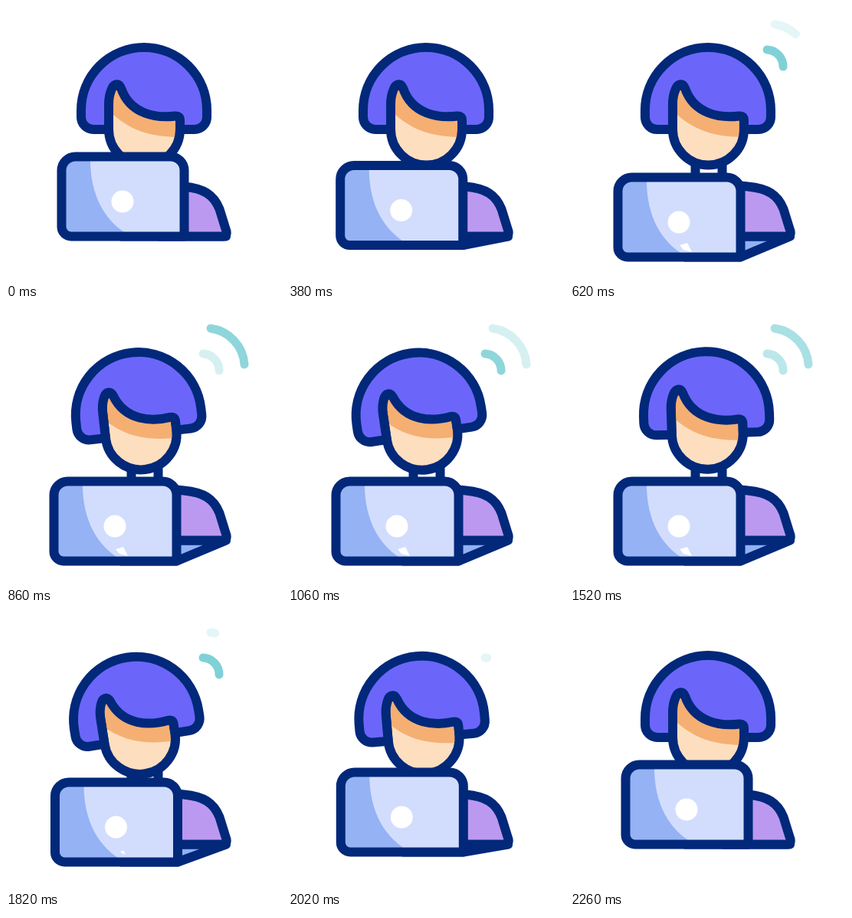
An HTML page for the animation above (2400 ms loop, 360x360 px).

```html
<!DOCTYPE html>
<html lang="en">
<head>
<meta charset="utf-8">
<title>Person at a laptop</title>
<style>
html, body { margin: 0; width: 100%; height: 100%; overflow: hidden; background: #fff; }
svg { display: block; width: 100vw; height: 100vh; }
.line { stroke: #02287a; stroke-width: 12; stroke-linejoin: round; stroke-linecap: round; }
.wave { fill: none; stroke: #7fd1d7; stroke-width: 11; stroke-linecap: round; }
</style>
</head>
<body>
<svg viewBox="0 0 360 360">
  <defs>
    <path id="face" d="M134 161V104H227V161A46.5 46.5 0 0 1 134 161Z"/>
    <path id="lidShape" d="M90.5 196.5H214.5A18 18 0 0 1 232.500 214.500V300.5H85A12.5 12.500 0 0 1 72.500 288V214.500A18 18 0 0 1 90.500 196.500Z"/>
    <clipPath id="faceClip"><use href="#face"/></clipPath>
    <clipPath id="lidClip"><use href="#lidShape"/></clipPath>
  </defs>

  <path id="outer" class="wave" pathLength="1" d="M267 24A51 51 0 0 1 311 71"/>
  <path id="inner" class="wave" pathLength="1" d="M257 57A22 22 0 0 1 278 79"/>

  <path class="line" fill="#fff" d="M163.5 195V232H198.5V195"/>
  <path id="base" class="line" fill="#92b1f4"/>
  <path class="line" fill="#bb99f0" d="M200 232L232 235.5C258 238 271 246 278.5 265L287.5 294Q288.5 300.5 283 300.5H200Z"/>

  <g id="head">
    <use href="#face" fill="#fddfbf"/>
    <path clip-path="url(#faceClip)" fill="#f5af73" d="M134 95H227V171C190 171 160 163 134 136Z"/>
    <use href="#face" class="line" fill="none"/>
    <path class="line" fill="#6b66f9" d="M134 161H114A16 16 0 0 1 98 145V136A82 82 0 0 1 262 136V145A16 16 0 0 1 246 161H227V149Q227 143 221 143.5C197 146.500 162 142 150 107C147 100 141 101 138 108Q134 117 134 128Z"/>
  </g>

  <g id="lid">
    <use href="#lidShape" fill="#d2ddfd"/>
    <path clip-path="url(#lidClip)" fill="#95b2f4" d="M72 196H110C109 247 129 283 166 302H72Z"/>
    <circle cx="152" cy="255" r="14.5" fill="#fff"/>
    <path id="glint" fill="#fff" d="M-8 -3L2 -6L8 6L-3 3Z"/>
    <use href="#lidShape" class="line" fill="none"/>
  </g>
</svg>
<script>
const LOOP = 2400;
const $ = id => document.getElementById(id);
const [outer, inner, base, head, lid, glint] =
  ["outer", "inner", "base", "head", "lid", "glint"].map($);

const ramp = (t, from, to) => {
  const u = Math.min(1, Math.max(0, (t - from) / (to - from)));
  return u * u * (3 - 2 * u);
};
// Rises over [a, b], falls over [c, d].
const pulse = (t, a, b, c, d) => ramp(t, a, b) - ramp(t, c, d);

function setWave(el, length, opacity) {
  el.style.visibility = length > 0.001 ? "visible" : "hidden";
  el.setAttribute("stroke-dasharray", `${length} 2`);
  el.setAttribute("opacity", opacity);
}

function draw(t) {
  const open = pulse(t, 200, 600, 1680, 2260);
  const dx = -10 * open, dy = 27 * open;
  lid.setAttribute("transform", `translate(${dx} ${dy})`);
  base.setAttribute("d", `M150 300.5H287L${232.5 + dx} ${300.5 + dy}H150Z`);
  glint.setAttribute("transform",
    `translate(161 288) scale(${Math.max(0, open - 0.75) * 4})`);

  const tilt = 9 * (pulse(t, 600, 1000, 1000, 1400) + pulse(t, 1400, 1820, 1820, 2260));
  head.setAttribute("transform", `rotate(${-tilt} 186 200)`);

  // The two waves glow in turn.
  const glow = 0.4 * Math.cos((t - 810) / 400 * 2 * Math.PI);
  setWave(outer, pulse(t, 520, 740, 1640, 1860), 0.6 + glow);
  setWave(inner, pulse(t, 400, 620, 1840, 2060), 0.6 - glow);
}

function tick() {
  draw(performance.now() % LOOP);
  requestAnimationFrame(tick);
}
tick();
</script>
</body>
</html>
```
